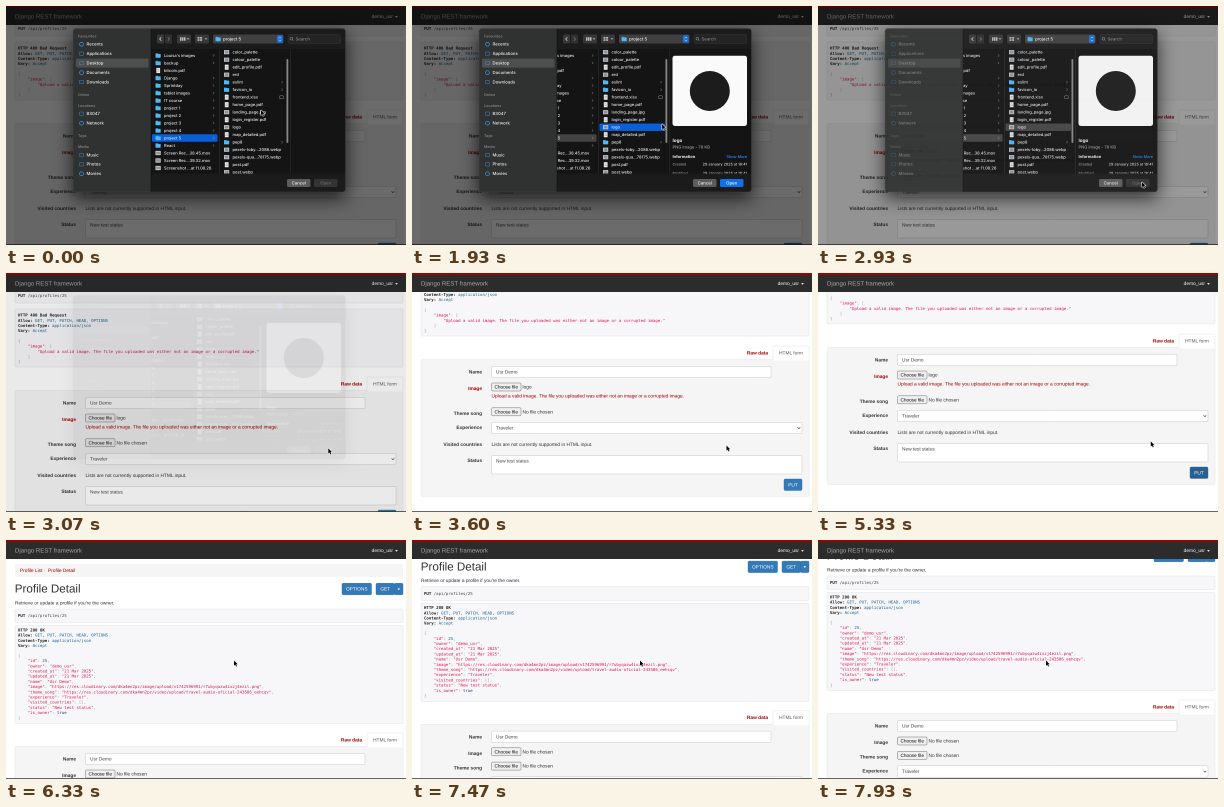
Recreate the animation shown at these times as an HTML page with a canvas. Size 400 px wide and 239 px high, loop 8 s.

```html
<!DOCTYPE html>
<html lang="en">
<head>
<meta charset="utf-8">
<title>Profile update</title>
<style>
html, body { margin: 0; width: 100%; height: 100%; overflow: hidden; background: #fff; }
canvas { display: block; width: 400px; height: 239px; }
</style>
</head>
<body>
<canvas id="stage"></canvas>
<script>
const W = 400, H = 239, LOOP = 8000;
const SANS = '"Liberation Sans", Arial, sans-serif';
const UI = 'Inter, Roboto, sans-serif';
const MONO = '"DejaVu Sans Mono", monospace';
const RED = '#a30000', STR = '#dd1144', LIT = '#195f91', PUN = '#93a1a1', INK = '#333', BLUE = '#337ab7';
const USER = 'demo_usr', NAME = 'Usr Demo', LEVEL = 'Traveler', STATUS = 'New test status';
const ERROR = 'Upload a valid image. The file you uploaded was either not an image or a corrupted image.';
const CHAR = 2.436, LINE = 5.2;

// Twice the screen resolution keeps the tiny type soft and unhinted.
const scale = 2 * Math.max(1, window.devicePixelRatio || 1);
function setup(c) {
  c.width = Math.round(W * scale);
  c.height = Math.round(H * scale);
  const x = c.getContext('2d');
  x.scale(scale, scale);
  x.textRendering = 'geometricPrecision';
  return x;
}
const layer = document.createElement('canvas');
const main = setup(document.getElementById('stage'));
const sheet = setup(layer);
let g = main;

// Smooth interpolation through [time, ...values] keys.
function at(t, keys) {
  if (t <= keys[0][0]) return keys[0].slice(1);
  for (let i = 1; i < keys.length; i++) {
    const a = keys[i - 1], b = keys[i];
    if (t < b[0]) {
      const u = (t - a[0]) / (b[0] - a[0]), e = u * u * (3 - 2 * u);
      return a.slice(1).map((v, k) => v + (b[k + 1] - v) * e);
    }
  }
  return keys[keys.length - 1].slice(1);
}

function rect(x, y, w, h, fill, stroke, r = 0) {
  g.beginPath();
  g.roundRect(x, y, w, h, r);
  if (fill) { g.fillStyle = fill; g.fill(); }
  if (stroke) { g.strokeStyle = stroke; g.lineWidth = 0.4; g.stroke(); }
}

// Set large and scaled down, so that glyph spacing stays exact.
function text(s, x, y, color = INK, { size = 4.8, weight = 400, font = SANS, align = 'left' } = {}) {
  const k = 8;
  g.save();
  g.translate(x, y);
  g.scale(1 / k, 1 / k);
  g.font = `${weight} ${size * k}px ${font}`;
  g.textAlign = align;
  g.textBaseline = 'middle';
  g.fillStyle = color;
  g.fillText(s, 0, 0);
  g.restore();
}

function line(pts, color, width = 0.6) {
  g.beginPath();
  pts.forEach(p => g.lineTo(p[0], p[1]));
  g.strokeStyle = color;
  g.lineWidth = width;
  g.stroke();
}

function poly(pts, color) {
  g.beginPath();
  pts.forEach(p => g.lineTo(p[0], p[1]));
  g.closePath();
  g.fillStyle = color;
  g.fill();
}

function ring(x, y, r, color, width) {
  g.beginPath();
  g.arc(x, y, r, 0, 7);
  g.strokeStyle = color;
  g.lineWidth = width;
  g.stroke();
}

const caret = (x, y, color) => poly([[x - 1.4, y - 0.7], [x + 1.4, y - 0.7], [x, y + 0.9]], color);

function clip(x, y, w, h, draw) {
  g.save();
  g.beginPath();
  g.rect(x, y, w, h);
  g.clip();
  draw();
  g.restore();
}

/* ---- web page ---- */

function code(col, y, parts) {
  let x = 12 + col * CHAR;
  for (const [s, color, weight] of parts) {
    text(s, x, y, color, { size: CHAR / 0.602, font: MONO, weight });
    x += s.length * CHAR;
  }
}

function headers(y, status, allow) {
  const rows = [['Allow:', allow], ['Content-Type:', 'application/json'], ['Vary:', 'Accept']];
  code(0, y, [[status, '#222', 700]]);
  rows.forEach(([k, v], i) => code(0, y + LINE * (i + 1), [[k + ' ', '#222', 700], [v, LIT]]));
}

const pre = (y, h) => rect(9, y, 388, h, '#f7f7f9', '#dcdce4', 1.2);

function request(y) {
  code(0, y, [['PUT', '#222', 700], [' /api/profiles/25', '#444']]);
}

function button(s, x, y, w, h, fill = BLUE) {
  rect(x, y, w, h, fill, '#2e6da4', 1.2);
  text(s, x + w / 2, y + h / 2 + 0.2, '#fff', { align: 'center' });
}

function field(x, y, w, h, value, vy = h / 2) {
  rect(x, y, w, h, '#fff', '#bbb', 1.2);
  text(value, x + 4.5, y + vy + 0.2, '#444');
}

function fileInput(y, value) {
  rect(79.5, y - 4, 29.5, 8, '#efefef', '#555', 1);
  text('Choose file', 94.2, y + 0.2, '#111', { size: 4.7, align: 'center' });
  text(value, 110.5, y + 0.2, INK);
}

// y is the centre of the first row.
function form(y, failed, hot) {
  const label = (s, dy, color = INK) => text(s, 70, y + dy, color, { weight: 700, align: 'right' });
  const d = failed ? 10.5 : 0;
  rect(9, y - 12.5, 388, 126.5 + d, '#f5f5f5', '#e0e0e0', 1.2);
  rect(361, y - 26, 36, 13.8, '#fff', '#ddd', 1);
  rect(361.3, y - 13.5, 35.4, 2, '#fff');
  text('Raw data', 356, y - 19, RED, { weight: 700, align: 'right' });
  text('HTML form', 379, y - 19, '#555', { align: 'center' });

  label('Name', 0.3);
  field(79.5, y - 5.7, 279.5, 11.4, NAME);
  label('Image', 16.8, failed ? RED : INK);
  fileInput(y + 15, failed ? 'logo' : 'No file chosen');
  if (failed) text(ERROR, 79.5, y + 24.3, RED);
  label('Theme song', 31.3 + d);
  fileInput(y + 29.3 + d, 'No file chosen');
  label('Experience', 45.3 + d);
  field(79.5, y + 39.8 + d, 310.5, 11.4, LEVEL);
  line([[385.5, y + 44.8 + d], [386.9, y + 46.2 + d], [388.3, y + 44.8 + d]], '#333');
  label('Visited countries', 62.3 + d);
  text('Lists are not currently supported in HTML input.', 79.5, y + 62.3 + d);
  label('Status', 78.3 + d);
  field(79.5, y + 73 + d, 310.5, 18.5, STATUS, 5.5);
  button('PUT', 372, y + 96.5 + d, 18, 11.5, hot ? '#286090' : BLUE);
}

function failedPage(scroll, hot) {
  const o = -scroll;
  pre(o + 15, 15);
  request(o + 23);
  pre(o + 36, 58);
  headers(o + 42.5, 'HTTP 400 Bad Request', 'GET, PUT, PATCH, HEAD, OPTIONS');
  const rows = [
    [0, [['{', PUN]]],
    [4, [['"image"', STR], [': [', PUN]]],
    [8, [['"' + ERROR + '"', STR]]],
    [4, [[']', PUN]]],
    [0, [['}', PUN]]]
  ];
  rows.forEach(([col, parts], i) => code(col, o + 68.3 + i * LINE, parts));
  form(o + 130, true, hot);
}

const host = 'https://res.cloudinary.com/dka4mn2pz/';
const fields = [
  ['id', '25', LIT],
  ['owner', USER],
  ['created_at', '21 Mar 2025'],
  ['updated_at', '21 Mar 2025'],
  ['name', NAME],
  ['image', host + 'image/upload/v1742596991/r7ubyqazw4ixzj4ezil.png'],
  ['theme_song', host + 'video/upload/travel-audio-oficial-243586_eehcqv'],
  ['experience', LEVEL],
  ['visited_countries', '[]', PUN],
  ['status', STATUS],
  ['is_owner', 'true', '#1e347b']
];

function savedPage(scroll) {
  const o = -scroll;
  rect(9, o + 24, 388, 13, '#f5f5f5', null, 1.2);
  text('Profile List', 14, o + 30.5, RED);
  text('/', 38.5, o + 30.5, '#bbb', { align: 'center' });
  text('Profile Detail', 42, o + 30.5, RED);
  text('Profile Detail', 8.8, o + 49.3, INK, { size: 11.6 });
  button('OPTIONS', 336, o + 43.3, 29.5, 11.5);
  button('GET', 370, o + 43.3, 18.5, 11.5);
  button('', 388.5, o + 43.3, 8.5, 11.5);
  caret(392.8, o + 49.2, '#fff');
  text("Retrieve or update a profile if you're the owner.", 9, o + 63, INK);
  pre(o + 69, 13.5);
  request(o + 76);
  pre(o + 85.5, 98);
  headers(o + 90.3, 'HTTP 200 OK', 'GET, PUT, PATCH, HEAD, OPTIONS');
  const y = o + 115.8;
  code(0, y, [['{', PUN]]);
  fields.forEach(([k, v, color], i) => {
    const end = i < fields.length - 1 ? ',' : '';
    code(4, y + LINE * (i + 1), [
      ['"' + k + '"', STR], [': ', PUN], [color ? v : '"' + v + '"', color || STR], [end, PUN]
    ]);
  });
  code(0, y + LINE * 12, [['}', PUN]]);
  form(o + 219, false, false);
}

function navbar() {
  rect(0, 0, W, 19, '#2c2c2c');
  rect(0, 0, W, 1.7, RED);
  text('Django REST framework', 9, 10.8, '#aaa', { size: 6.07 });
  text(USER, 387, 10.8, '#fff', { align: 'right' });
  caret(390.5, 10.8, '#fff');
}

/* ---- file dialog ---- */

const BOX = [67, 22.5, 272.5, 163.5];
const LIST = '#141414', BAR = '#1b1b1b', SIDE = '#303231';

const ui = (s, x, y, color = '#ececec', size = 4.05, more = {}) =>
  text(s, x, y, color, { size, font: UI, weight: 500, ...more });

// First letter: f folder, d document, p picture.
const parents = ["fLouisa's images", 'fbackup', 'dbitcoin.pdf', 'fDjango', 'fSprintday', 'ftablet images',
  'fIT course', 'fproject 1', 'fproject 2', 'fproject 3', 'fproject 4', 'fproject 5', 'fReact',
  'pScreen Rec...38.45.mov', 'pScreen Rec...39.32.mov', 'pScreenshot ...at 11.08.26'];
const files = ['pcolor_palette', 'pcolour_palette', 'dedit_profile.pdf', 'perd', 'feslint', 'ffavicon_io',
  'dfrontend.xlsx', 'dhome_page.pdf', 'planding_page.jpg', 'dlogin_register.pdf', 'plogo',
  'dmap_detailed.pdf', 'fpep8', 'ppexels-toby...2086.webp', 'ppexels-qua...78175.webp', 'dpost.pdf', 'ppost.webp'];

function icon(kind, x, y) {
  if (kind === 'f') {
    rect(x, y - 2.2, 2.6, 2, '#2f9be0', null, 0.5);
    rect(x, y - 1.6, 5.2, 3.8, '#4db8f5', null, 0.5);
  } else if (kind === 'd') {
    rect(x + 0.8, y - 2.6, 3.8, 5.2, '#e8e8e8', null, 0.3);
    rect(x + 1.5, y - 1, 2.4, 0.5, '#999');
    rect(x + 1.5, y + 0.4, 2.4, 0.5, '#999');
  } else {
    rect(x, y - 2.1, 5.2, 4.2, '#d8d8d8', null, 0.3);
    rect(x + 0.6, y - 1.4, 4, 2.8, '#8b959a');
  }
}

function column(list, x, y, w, picked, pickColor) {
  list.forEach((s, i) => {
    const cy = y + i * 7.5, kind = s[0];
    if (i === picked) rect(x, cy - 3.75, w, 7.5, pickColor, null, 1);
    icon(kind, x + 3.5, cy);
    ui(s.slice(1), x + 12, cy + 0.1);
    const cx = x + w - 4.5;
    if (kind === 'f') line([[cx, cy - 1.2], [cx + 1.2, cy], [cx, cy + 1.2]], '#999', 0.5);
    if (s === 'dfrontend.xlsx') rect(cx - 2, cy - 1.4, 4, 2.8, null, '#aaa', 0.6);
  });
}

function sidebar(off) {
  rect(67, 22, 78, 164, SIDE);
  const head = (s, y) => ui(s, 72, y, '#8b8b8b', 3.7);
  rect(70, 52.6, 72.5, 9, off ? '#434644' : '#4d4f4e', null, 1.5);
  g.globalAlpha = off ? 0.4 : 1;
  head('Favourites', 30.3);
  head('Online', 89);
  head('Locations', 100);
  head('Tags', 130);
  head('Media', 140.7);
  const items = [['Recents', 38.3], ['Applications', 47.7], ['Desktop', 57.1], ['Documents', 66.6], ['Downloads', 76],
    ['B3047', 107.7], ['Network', 117.2], ['Music', 149], ['Photos', 158.3], ['Movies', 167.7]];
  items.forEach(([s, y], i) => {
    if (i % 3 === 0) ring(75.5, y, 1.9, '#3d9df5', 0.7);
    else rect(73.4, y - 1.7, 4.2, 3.4, null, '#3d9df5', 0.6);
    ui(s, 80.5, y + 0.1, '#f0f0f0', 4.25);
  });
  g.globalAlpha = 1;
}

function toolbar() {
  rect(145, 22, 196, 21, BAR);
  rect(151, 28.5, 7, 9, '#383838', null, 1.3);
  rect(159, 28.5, 7, 9, '#303030', null, 1.3);
  line([[155.3, 31.2], [153.6, 33], [155.3, 34.8]], '#ddd', 0.7);
  line([[161.8, 31.2], [163.5, 33], [161.8, 34.8]], '#777', 0.7);
  rect(171, 28.5, 14, 9, '#383838', null, 1.5);
  for (let i = 0; i < 3; i++) rect(174 + i * 2, 31.2, 1.5, 3.6, '#bbb');
  caret(182, 33, '#aaa');
  rect(189, 28.5, 14, 9, '#383838', null, 1.5);
  for (let i = 0; i < 4; i++) rect(191.5 + (i % 2) * 2.6, 31 + (i >> 1) * 2.3, 2, 1.6, '#bbb');
  caret(200, 33, '#aaa');
  rect(207, 28.5, 70.5, 9, '#404040', null, 1.5);
  icon('f', 209.5, 33);
  ui('project 5', 217, 33.2, '#f2f2f2', 4.3);
  rect(271, 29.3, 5.7, 7.4, '#1673e6', null, 1.3);
  line([[272.7, 32.2], [273.9, 31], [275.1, 32.2]], '#fff', 0.5);
  line([[272.7, 33.9], [273.9, 35.1], [275.1, 33.9]], '#fff', 0.5);
  rect(282, 28.5, 52.5, 9, '#242424', '#3c3c3c', 1.5);
  ring(285.4, 32.7, 1.4, '#aaa', 0.5);
  line([[286.4, 33.7], [287.5, 34.8]], '#aaa', 0.5);
  ui('Search', 289.5, 33.2, '#8a8a8a', 4.3);
}

// x is the left edge of the preview column.
function preview(x) {
  const l = x + 3, r = x + 77.5, right = { align: 'right' };
  rect(x, 43, 84, 126, LIST);
  rect(l, 49.7, 74.5, 70.3, '#fafafa', null, 2.5);
  g.beginPath();
  g.arc(x + 40.3, 85, 20, 0, 7);
  g.fillStyle = '#1c1c1c';
  g.fill();
  ui('logo', l, 134.8, '#f2f2f2', 4.6, { weight: 700 });
  ui('PNG image - 78 KB', l, 141.3, '#a0a0a0', 4.1);
  ui('Information', l, 150.8, '#f2f2f2', 4, { weight: 700 });
  ui('Show More', r, 150.8, '#2f8cff', 3.8, right);
  const stamp = (s, y) => {
    ui(s, l, y, '#a0a0a0', 3.6);
    ui('29 January 2025 at 18:41', r, y, '#ddd', 3.7, right);
  };
  stamp('Created', 158.2);
  stamp('Modified', 167.2);
}

function dialog(t) {
  const picked = t >= 1670, off = t >= 2850;
  const p = at(t, [[1670, 0], [1930, 1]])[0], dx = -27 * p;
  const accent = '#0a5fd8', grey = '#444';
  g.save();
  g.shadowColor = 'rgba(0,0,0,0.75)';
  g.shadowBlur = 18 * scale;
  g.shadowOffsetY = 6 * scale;
  rect(...BOX, LIST, null, 3);
  g.restore();

  g.save();
  g.beginPath();
  g.roundRect(...BOX, 3);
  g.clip();
  sidebar(off);
  toolbar();
  clip(145, 43, 196, 124.5, () => {
    column(parents, 146 + dx, 49.5, 65.5, 11, picked ? grey : accent);
    rect(213.5 + dx, 43, 0.5, 126, '#333');
    column(files, 214.5 + dx, 46.2, 65.5, picked ? 10 : -1, off ? grey : accent);
    rect(280.5 + dx, 53, 1.8, 84, '#888', null, 0.9);
    rect(284 + dx, 43, 0.5, 126, '#333');
    if (picked) preview(284.5 + dx);
  });
  rect(145, 167.5, 196, 20, BAR);
  rect(281, 173, 23.5, 8, '#5c5c5c', null, 1.6);
  ui('Cancel', 292.7, 177.1, '#f2f2f2', 4.3, { align: 'center' });
  const ready = picked && !off;
  rect(308, 173, 23.5, 8, ready ? '#1070e8' : '#333', null, 1.6);
  ui('Open', 319.7, 177.1, ready ? '#fff' : '#6a6a6a', 4.3, { align: 'center' });
  rect(144.7, 22, 0.5, 165, '#111');
  g.restore();
  rect(...BOX, null, '#4a4a4a', 3);
}

/* ---- playback ---- */

const moves = [[0, 255, 104], [70, 255, 104], [800, 253, 112], [1450, 250, 118], [2070, 250, 118],
  [2700, 324, 176], [2950, 324, 176], [3400, 314.5, 172.5], [3620, 314.5, 172.5], [4120, 379, 189.5],
  [5000, 379, 189.5], [5900, 228, 120.5]];

function cursor(t) {
  const [x, y] = at(t, moves);
  g.save();
  g.translate(x, y);
  const shape = [[0, 0], [0, 5.2], [1.2, 4.1], [2.1, 6], [3, 5.6], [2.1, 3.8], [3.7, 3.7]];
  g.lineJoin = 'round';
  line([...shape, shape[0]], '#fff', 0.9);
  poly(shape, '#000');
  g.restore();
}

function draw(t) {
  g = main;
  rect(0, 0, W, H, '#fff');
  if (t < 5600) {
    failedPage(at(t, [[3150, 0], [3600, 31], [3980, 43]])[0], t > 4080);
  } else {
    savedPage(at(t, [[6730, 0], [7930, 33]])[0]);
  }
  navbar();
  rect(0, 238.2, W, 0.8, '#333');

  const shade = at(t, [[2800, 0.58], [2930, 0.4], [3130, 0]])[0];
  const alpha = at(t, [[2830, 1], [2930, 0.92], [3100, 0]])[0];
  if (shade > 0) rect(0, 0, W, H, `rgba(0,0,0,${shade})`);
  if (alpha > 0) {
    g = sheet;
    g.clearRect(0, 0, W, H);
    dialog(t);
    g = main;
    g.globalAlpha = alpha;
    g.drawImage(layer, 0, 0, W, H);
    g.globalAlpha = 1;
  }
  cursor(t);
}

function tick() {
  draw(performance.now() % LOOP);
  requestAnimationFrame(tick);
}
tick();
</script>
</body>
</html>
```
